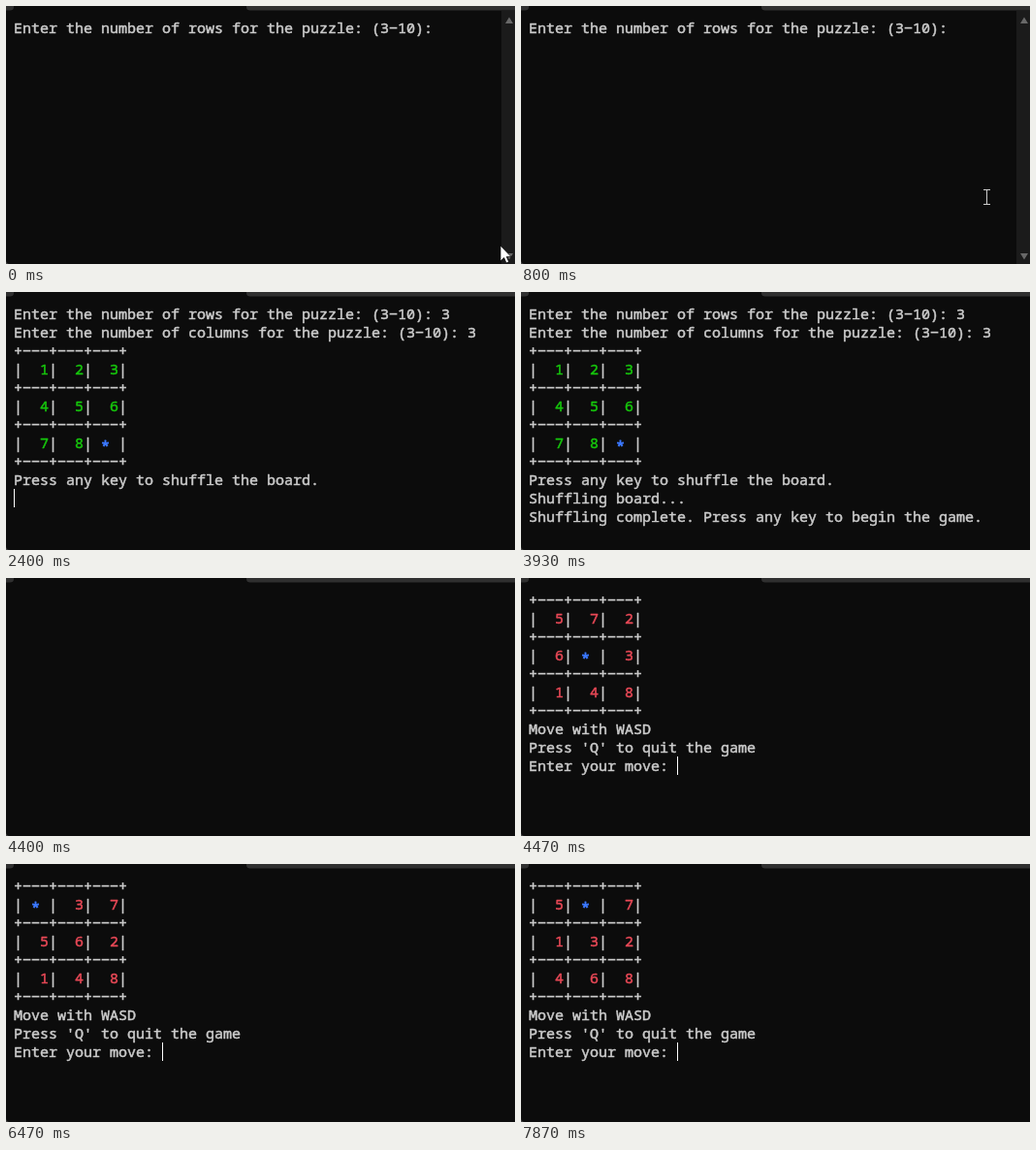
Animation of 525 by 266 pixels, one loop 8 s. Source, as an HTML page with a canvas:

```html
<!DOCTYPE html>
<html lang="en">
<head>
<meta charset="utf-8">
<title>Sliding puzzle in a terminal</title>
<style>
html, body { margin: 0; width: 525px; height: 266px; overflow: hidden; background: #0c0c0c; }
canvas { display: block; }
</style>
</head>
<body>
<canvas id="stage" width="525" height="266"></canvas>
<script>
const ctx = document.getElementById('stage').getContext('2d');
const LOOP = 8000, LEFT = 8, TOP = 13, CELL = 9, LINE = 19;
const GREY = '#cccccc', GREEN = '#16c60c', RED = '#e74856', BLUE = '#3b78ff';

const ROWS = 'Enter the number of rows for the puzzle: (3-10): ';
const COLS = 'Enter the number of columns for the puzzle: (3-10): ';
const SOLVED = '12345678*', SHUFFLED = '5726*3148';

// Blank moves: time and direction
const MOVES = [[5270, 'D'], [5530, 'W'], [5730, 'A'], [6070, 'S'], [6270, 'A'], [6470, 'W'],
  [6930, 'S'], [7130, 'S'], [7330, 'D'], [7600, 'W'], [7870, 'W']];
const STEP = { W: -3, S: 3, A: -1, D: 1 };

// Pointer stops: time and centre
const POINTER = [[70, 479, 197], [130, 454, 181], [270, 464, 188], [370, 474, 194], [470, 480, 197]];

// A thin outline gives the glyphs their semi-bold weight
function glyph(ch, col, row, color) {
  const x = LEFT + col * CELL, y = TOP + 15 + row * LINE;
  ctx.fillStyle = ctx.strokeStyle = color;
  if (ch === '-') {
    ctx.fillRect(x + 0.6, y - 6.2, 7.8, 1.7);
    return;
  }
  const base = ch === '*' ? y + 3 : y;
  ctx.lineWidth = ch === '*' ? 0.9 : 0.5;
  ctx.fillText(ch, x, base);
  ctx.strokeText(ch, x, base);
}

function print(text, row, color = GREY) {
  [...text].forEach((ch, i) => {
    if (ch !== ' ') glyph(ch, i, row, color);
  });
}

function caret(col, row) {
  ctx.fillStyle = '#ffffff';
  ctx.fillRect(LEFT + col * CELL, TOP + row * LINE, 1, LINE);
}

function board(tiles, row, color) {
  for (let r = 0; r < 4; r++) {
    print('+---+---+---+', row + 2 * r);
    if (r < 3) print('|   |   |   |', row + 2 * r + 1);
  }
  [...tiles].forEach((ch, i) => {
    const blank = ch === '*';
    glyph(ch, i % 3 * 4 + (blank ? 2 : 3), row + 1 + 2 * Math.floor(i / 3), blank ? BLUE : color);
  });
}

function tilesAt(t) {
  const tiles = [...SHUFFLED];
  for (const [time, key] of MOVES) {
    if (t < time) break;
    const from = tiles.indexOf('*'), to = from + STEP[key];
    [tiles[from], tiles[to]] = [tiles[to], tiles[from]];
  }
  return tiles;
}

function shape(path, color) {
  ctx.fillStyle = color;
  ctx.fill(new Path2D(path));
}

function windowFrame() {
  ctx.fillStyle = '#0c0c0c';
  ctx.fillRect(0, 0, 525, 266);
  shape('M0 0H8V1Q8 4.5 4 4.5H0Z M248 0H525V4.5H252Q248 4.5 248 1Z', '#303030');
  shape('M0 262Q0 266 4 266H0Z', '#444444');
}

function scrollbar(t) {
  ctx.globalAlpha = t < 1070 ? 1 : t < 1130 ? 0.5 : 0;
  ctx.fillStyle = '#1b1b1b';
  ctx.fillRect(511, 5, 14, 261);
  shape('M519 11.5L523 18H515Z M515 255H523L519 261.5Z', '#686868');
  ctx.globalAlpha = 1;
}

function pointer(t) {
  if (t < 70) {
    const arrow = new Path2D('M510 247V263L513.7 259.6L516 265L518.7 263.8L516.3 258.6H521Z');
    ctx.fillStyle = '#ffffff';
    ctx.fill(arrow);
    ctx.strokeStyle = '#000000';
    ctx.lineWidth = 0.7;
    ctx.stroke(arrow);
  } else if (t < 1000) {
    const [, x, y] = POINTER.filter(p => p[0] <= t).pop();
    ctx.fillStyle = GREY;
    ctx.fillRect(x, y - 8, 1, 16);
    ctx.fillRect(x - 3, y - 8, 7, 1);
    ctx.fillRect(x - 3, y + 7, 7, 1);
  }
}

function setup(t) {
  print(ROWS + (t < 1000 ? '' : '3'), 0);
  if (t >= 270 && t < 800) caret(49, 0);
  if (t >= 1000 && t < 1400) caret(50, 0);
  if (t < 1400) return;

  print(COLS + (t < 2070 ? '' : '3'), 1);
  if (t < 2400) return caret(t < 2070 ? 52 : 53, 1);

  board(SOLVED, 2, GREEN);
  print('Press any key to shuffle the board.', 9);
  if (t < 3000) caret(0, 10);
  if (t < 3330) return;

  print('Shuffling board...', 10);
  print('Shuffling complete. Press any key to begin the game.', 11);
  if (t < 3930) caret(0, 12);
}

function game(t) {
  board(tilesAt(t), 0, RED);
  print('Move with WASD', 7);
  print("Press 'Q' to quit the game", 8);
  print('Enter your move: ', 9);
  if (t < 5000 || t >= 5270) caret(17, 9);
}

function draw(t) {
  ctx.font = '500 15px "Noto Sans Mono", "DejaVu Sans Mono", monospace';
  ctx.lineJoin = 'round';
  windowFrame();
  scrollbar(t);
  if (t < 4400) setup(t);
  else if (t >= 4470) game(t);
  pointer(t);
}

const start = performance.now();
function tick() {
  draw((performance.now() - start) % LOOP);
  requestAnimationFrame(tick);
}
tick();
</script>
</body>
</html>
```
